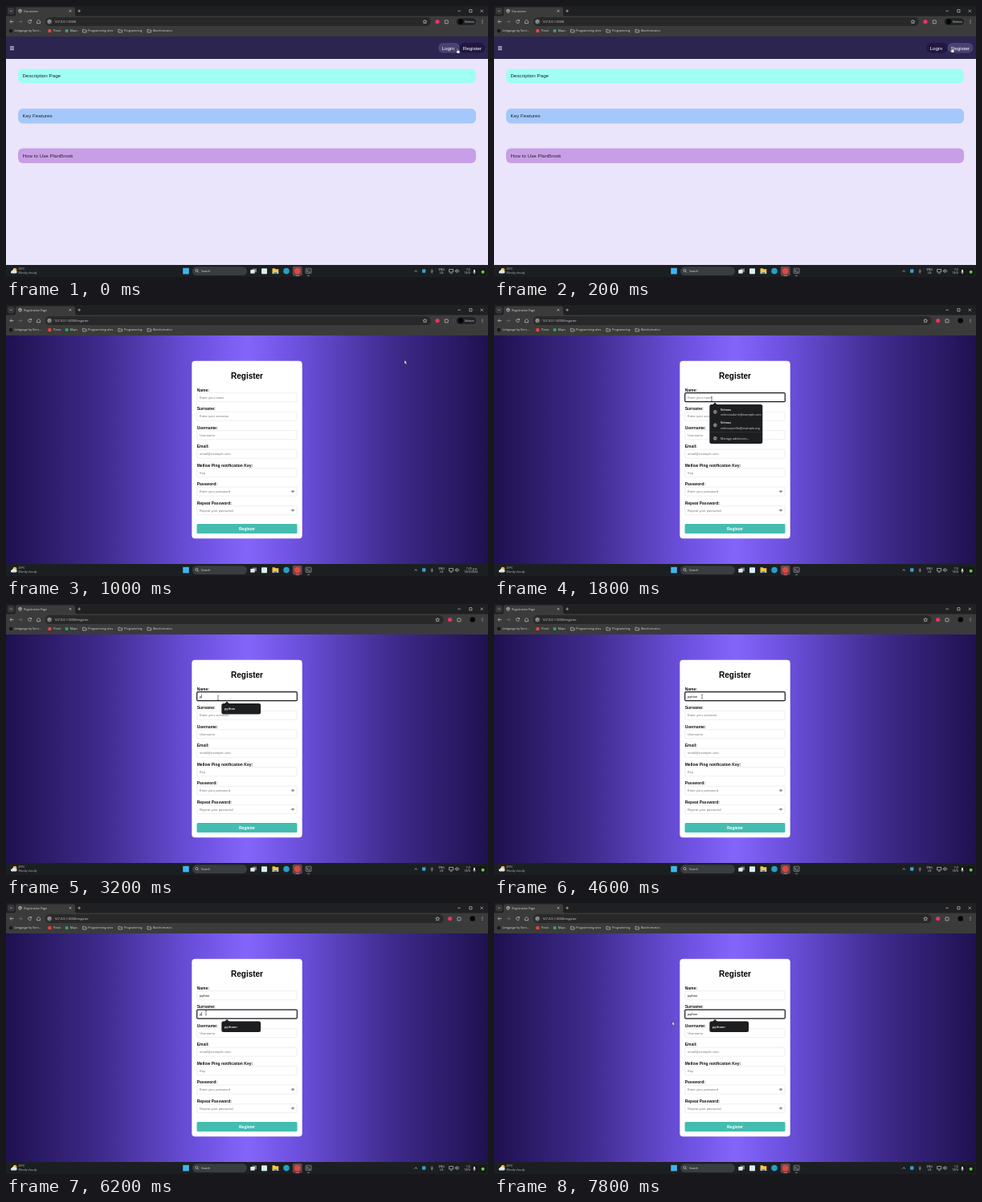
These frames come from a looping animation (600 by 338 pixels, 8000 ms). An HTML page:

```html
<!DOCTYPE html>
<html lang="en">
<head>
<meta charset="utf-8">
<title>Registration</title>
<style>
html, body { margin: 0; width: 100%; height: 100%; overflow: hidden; background: #1f1f1f; }
svg { display: block; width: 600px; height: 338px; }
text { white-space: pre; }
.ui { font: 3.55px "Open Sans", "Noto Sans", sans-serif; fill: #dcdcdc; }
.page { font: 6.25px "Liberation Sans", Arial, sans-serif; fill: #222; }
.label { font-size: 5px; font-weight: bold; fill: #111; }
.input { font-size: 4.17px; }
.mid { text-anchor: middle; }
.end { text-anchor: end; }
.line { fill: none; stroke: #cfcfcf; stroke-width: .65; }
.bold { font-weight: 600; fill: #fff; }
</style>
</head>
<body>
<svg viewBox="0 0 600 338">
  <defs>
    <linearGradient id="purple">
      <stop offset="0" stop-color="#1f1150"/>
      <stop offset=".2" stop-color="#3f2b8d"/>
      <stop offset=".4" stop-color="#6d51df"/>
      <stop offset=".5" stop-color="#8465fb"/>
      <stop offset=".6" stop-color="#6d51df"/>
      <stop offset=".8" stop-color="#3f2b8d"/>
      <stop offset="1" stop-color="#1f1150"/>
    </linearGradient>
    <g id="folder"><path class="line" d="M-2.3-1.7h1.7l.7.8h2.2v2.8h-4.6z"/></g>
    <g id="globe" class="line"><circle r="2"/><path d="M-1.8-.6h2l-.6 1.4v1M.5-1.8v1.2l1.3.6"/></g>
    <g id="eye" fill="none" stroke="#777" stroke-width=".5">
      <path d="M-2.3 0q2.3-2.7 4.6 0q-2.3 2.7-4.6 0z"/><circle r=".8" fill="#777"/>
    </g>
    <g id="person" class="line" stroke-width=".5">
      <circle r="1.9"/><circle cy="-.5" r=".6"/><path d="M-1.2 1.3q1.2-1.2 2.4 0"/>
    </g>
  </defs>

  <!-- landing page -->
  <g id="home" class="page">
    <path fill="#ebe5fb" d="M0 38h600v285H0z"/>
    <path fill="#2c2550" d="M0 38h600v28H0z"/>
    <path d="M5 50.7h5M5 52.6h5M5 54.5h5" stroke="#fff" stroke-width=".8"/>
    <rect id="loginPill" x="538" y="46" width="27" height="12.5" rx="6.2"/>
    <rect id="registerPill" x="564.5" y="46" width="32" height="12.5" rx="6.2"/>
    <g fill="#fff"><text x="542.6" y="54.5">Login</text><text x="568.8" y="54.5">Register</text></g>
    <rect x="15" y="78.5" width="570" height="18" rx="6" fill="#9ffff5"/>
    <rect x="15" y="128" width="570" height="18.4" rx="6" fill="#a5c8fb"/>
    <rect x="15" y="177.6" width="570" height="18.4" rx="6" fill="#c89fe6"/>
    <text x="20.5" y="89.4">Description Page</text>
    <text x="20.5" y="139.2">Key Features</text>
    <text x="20.5" y="188.9">How to Use PlanBrook</text>
  </g>

  <!-- registration form -->
  <g id="form" class="page">
    <path fill="url(#purple)" d="M0 38h600v285H0z"/>
    <rect x="231.3" y="69.7" width="137.4" height="221.6" rx="4" fill="#fff"/>
    <text class="mid" x="300" y="92" font-weight="bold" font-size="10" style="font-size:10px;fill:#000">Register</text>
    <g id="fields"></g>
    <rect x="237.5" y="273" width="125" height="12" rx="1.5" fill="#44bdb0"/>
    <text class="label mid" x="300" y="280.6" style="fill:#fff">Register</text>
    <rect id="caret" width=".5" height="5" fill="#111"/>
    <g id="addresses" class="ui" style="font-size:3.75px">
      <path fill="#1d1e20" d="M272 124.5l3-3 3 3z"/>
      <rect x="268.3" y="124" width="66" height="49" rx="2.5" fill="#1d1e20"/>
      <use href="#person" x="275.3" y="133.3"/>
      <text class="bold" x="282" y="132">Velmos</text>
      <text x="282" y="138.3">velmosadurin@example.com</text>
      <use href="#person" x="275.3" y="149.8"/>
      <text class="bold" x="282" y="148.4">Velmos</text>
      <text x="282" y="154.7">velmosprofile@example.org</text>
      <path d="M268.3 158.6h66" stroke="#484a4d" stroke-width=".4"/>
      <use href="#person" x="275.3" y="166.3"/>
      <text x="282" y="167.7">Manage addresses...</text>
    </g>
    <g id="hint" class="ui">
      <path fill="#1d1e20" d="M272 124.5l3-3 3 3z"/>
      <rect x="268.3" y="124" width="48.8" height="13.6" rx="2.5" fill="#1d1e20"/>
      <text id="hintText" class="bold" x="272" y="132.2" style="font-size:3.9px"></text>
    </g>
  </g>

  <!-- browser -->
  <g class="ui">
    <path fill="#1f2021" d="M0 0h600v13H0z"/>
    <path fill="#3b3b3c" d="M0 12.5h600V38H0zM10 12.5q2 0 2-2V4q0-2.5 2.5-2.5h69q2.5 0 2.5 2.5v6.5q0 2 2 2z"/>
    <rect x="2" y="2" width="8.5" height="8.5" rx="2.3" fill="#363738"/>
    <path class="line" d="M5.1 5.6l1.2 1.3 1.2-1.3M78.7 4.9l2.6 2.6m0-2.6l-2.6 2.6M89.3 6.2h3.6M91.1 4.4V8M562.3 6.2h3.6M576.8 4.6h3.2v3.2h-3.2zM590.7 4.6l3.2 3.2m0-3.2l-3.2 3.2"/>
    <use href="#globe" x="17.6" y="6.2"/>
    <text id="title" x="22.3" y="7.6"></text>
    <path class="line" d="M9.5 19.5H5m2-2l-2 2 2 2M31.5 18.5a2 2 0 1 0 .1 1.6M31.6 17v1.7h-1.7M38.5 19.2l2-1.8 2 1.8v2.5h-4z"/>
    <path class="line" style="stroke:#777" d="M15.5 19.5H20m-2-2l2 2-2 2"/>
    <rect id="bar" x="48.8" y="14" height="11" rx="5.5" fill="#282829"/>
    <circle cx="54" cy="19.5" r="3.8" fill="#3b3b3c"/>
    <use href="#globe" x="54" y="19.5"/>
    <text id="url" x="60" y="21" style="font-size:4px"></text>
    <g id="tools">
      <path class="line" d="M521.5 17.2l.7 1.5 1.7.2-1.2 1.2.3 1.7-1.5-.8-1.5.8.3-1.7-1.2-1.2 1.7-.2z"/>
      <circle cx="537" cy="19.5" r="2.6" fill="#e8345e"/>
      <path class="line" d="M546.3 18h1.4q.2-1.3 1 0h1.5v1.3q1.4.4 0 1.2v1.3h-3.9z"/>
    </g>
    <g id="profile">
      <path d="M556.6 17v5" stroke="#666" stroke-width=".4"/>
      <rect x="560" y="14.3" width="26" height="10.5" rx="5.2" fill="#222426" stroke="#66696c" stroke-width=".4"/>
      <circle cx="566" cy="19.5" r="3.3" fill="#050505"/>
      <text x="571" y="20.8">Velmos</text>
    </g>
    <circle id="avatar" cx="580.7" cy="19.5" r="3.3" fill="#070707"/>
    <g fill="#ddd"><circle cx="593" cy="17.7" r=".5"/><circle cx="593" cy="19.5" r=".5"/><circle cx="593" cy="21.3" r=".5"/></g>
    <circle cx="6" cy="31" r="2.2" fill="#15161f"/>
    <rect x="52.4" y="29.1" width="3.9" height="3.9" fill="#e3483d"/>
    <circle cx="75.6" cy="31" r="2.1" fill="#35a566"/>
    <use href="#folder" x="97.8" y="31"/><use href="#folder" x="142.2" y="31"/><use href="#folder" x="178.3" y="31"/>
    <text x="10.5" y="32.3">Linkgauge by Vorn...</text>
    <text x="59" y="32.3">Posto</text>
    <text x="79.8" y="32.3">Maps</text>
    <text x="102.2" y="32.3">Programming sites</text>
    <text x="147" y="32.3">Programming</text>
    <text x="182.9" y="32.3">Bioinformatics</text>
  </g>

  <!-- taskbar -->
  <g class="ui">
    <path fill="#1c1f22" d="M0 323h600v15H0z"/>
    <circle cx="11" cy="329.2" r="2.4" fill="#f4b53c"/>
    <path fill="#dfe5ec" d="M7.5 333.5a1.6 1.6 0 0 1 0-3.2 2.3 2.3 0 0 1 4.3-.2 1.7 1.7 0 0 1 .4 3.4z"/>
    <text x="15.6" y="329.2">29°C</text>
    <text x="15.6" y="334.3" style="fill:#b9bcbf">Mostly cloudy</text>
    <rect x="220.2" y="326.8" width="7.6" height="7.6" fill="#3fb5ee"/>
    <rect x="232" y="325.2" width="68" height="10.8" rx="5.4" fill="#3a3d40"/>
    <g class="line"><circle cx="237.4" cy="330" r="1.5"/><path d="M238.5 331.1l1.4 1.4"/></g>
    <text x="243" y="332">Search</text>
    <path fill="#777b80" d="M306.5 327.5h5.5v4.6h-5.5z"/><path fill="#e8e8e8" d="M304.3 329h5.3v4.6h-5.3z"/>
    <rect x="318" y="327.2" width="7" height="7" rx="1" fill="#d8eef4"/>
    <path fill="#f5c64b" d="M331.5 327.3h3l1 1h3.8v5.7h-7.8z"/><path fill="#3c8edb" d="M333.5 332h4v2h-4z"/>
    <circle cx="349" cy="330.6" r="3.8" fill="#269fc4"/>
    <rect x="356.8" y="324.8" width="11.8" height="11.8" rx="1.8" fill="#64474d"/>
    <circle cx="362.7" cy="330.6" r="3.8" fill="#e0483f"/>
    <path d="M360.5 336.3h4.5" stroke="#ff7d8a" stroke-width=".8"/>
    <rect x="373" y="327.2" width="7.2" height="6.4" rx=".8" fill="#34383b" stroke="#a9adb0" stroke-width=".5"/>
    <path class="line" d="M374.4 329l1.3 1.2-1.3 1.2M376.5 332h2M375.3 336.3h2.4"/>
    <path class="line" d="M508.4 331.5l1.8-1.7 1.8 1.7M530.2 328.2v2.6M528.6 330.3q1.6 3 3.2 0M530.2 332v1.5M551.6 328.5h5v3.4h-5zM553 333.3h2.4M559.3 329.7h1l1.4-1.3v4.2l-1.4-1.3h-1zM563 329q1.2 1.5 0 3"/>
    <rect x="518" y="328.3" width="4.4" height="4.4" rx="1" fill="#3b9dcc"/>
    <text class="mid" x="542.2" y="329.5">ENG</text><text class="mid" x="542.2" y="334.4">US</text>
    <text id="clock" class="end" x="587" y="329.5"></text>
    <text class="end" x="587" y="334.4">13/9/2024</text>
    <g id="overlay">
      <rect x="578.2" y="326.8" width="9.6" height="10" rx="1" fill="#17181a"/>
      <rect x="588.8" y="326.8" width="9.6" height="10" rx="1" fill="#17181a"/>
      <path d="M583 329.6v2.2" stroke="#fff" stroke-width="1.6" stroke-linecap="round"/>
      <path d="M581.2 331.8q1.8 2.6 3.6 0M583 333v1.6" fill="none" stroke="#fff" stroke-width=".5"/>
      <circle cx="593.6" cy="331.8" r="2" fill="#5fd13c"/>
    </g>
  </g>

  <g id="cursor">
    <path id="arrow" d="M0 0v4.6l1.1-1 .8 1.7.8-.4-.8-1.6h1.4z" fill="#fff" stroke="#111" stroke-width=".35"/>
    <path id="hand" d="M-.5.3q.5-.7 1 0v2l2 .5q.6.3.5 1l-.4 2.3h-3L-1.8 3.700q0-.8 1.300-.1z" fill="#fff" stroke="#111" stroke-width=".4"/>
    <path id="beam" d="M-1-2.600h.7l.3.300.3-.300H1M0-2.300v4.600M-1 2.600h.7l.3-.300.3.300H1" fill="none" stroke="#222" stroke-width=".55"/>
  </g>
</svg>
<script>
const LOOP = 8000, STEP = 200, PITCH = 23.5;
const $ = id => document.getElementById(id);
const show = (id, on) => $(id).style.display = on ? '' : 'none';

const fields = [
  ['Name', 'Enter your name'], ['Surname', 'Enter your surname'], ['Username', 'Username'],
  ['Email', 'email@example.com'], ['Mellow Ping notification Key', 'Key'],
  ['Password', 'Enter your password'], ['Repeat Password', 'Repeat your password']
];
$('fields').innerHTML = fields.map(([label, hint], i) => `
  <g transform="translate(0 ${i * PITCH})">
    <text class="label" x="237.700" y="107.800">${label}:</text>
    <rect id="box${i}" x="237.700" y="109.700" width="124.600" height="11" rx="1.200"/>
    <text id="value${i}" class="input" x="240.900" y="116.600" style="fill:#777">${hint}</text>
    ${i > 4 ? '<use href="#eye" x="357" y="115"/>' : ''}
  </g>`).join('');

// time, x, y
const path = [
  [0, 562, 53], [200, 570, 52], [400, 573, 52], [800, 573, 52], [1400, 276, 117], [1600, 271, 117],
  [3000, 271, 117], [3200, 264, 117], [4200, 264, 117], [4600, 259, 115.5], [4800, 256, 122],
  [5200, 249, 137], [6800, 249, 137], [7600, 222, 148], [8000, 222, 148]
];

function pointer(t) {
  const n = path.findIndex(p => p[0] > t);
  const [t0, x0, y0] = path[n - 1], [t1, x1, y1] = path[n];
  const k = (t - t0) / (t1 - t0), e = k * k * (3 - 2 * k);
  return [x0 + (x1 - x0) * e, y0 + (y1 - y0) * e];
}

const typed = (t, start) =>
  'python'.slice(0, Math.max(0, Math.floor((t - start) / STEP) + 1));

function setField(i, text, focused) {
  const value = $('value' + i), box = $('box' + i);
  value.textContent = text || fields[i][1];
  value.style.fill = text ? '#111' : '#777';
  box.setAttribute('fill', '#fff');
  box.setAttribute('stroke', focused ? '#15171c' : '#dedee2');
  box.setAttribute('stroke-width', focused ? 1.2 : .5);
}

function draw(t) {
  const home = t < 400, early = t < 1400;
  show('home', home);
  show('form', !home);
  show('profile', early);
  show('avatar', !early);
  show('overlay', home || !early);
  $('loginPill').setAttribute('fill', t < 200 ? '#4b4273' : '#211742');
  $('registerPill').setAttribute('fill', t < 200 ? '#211742' : '#4b4273');
  $('title').textContent = home ? 'Document' : 'Registration Page';
  $('url').textContent = '127.0.0.1:5000' + (home ? '' : '/register');
  $('clock').textContent = (!home && early ? '7:25' : '7:27') + ' μ.μ.';
  $('bar').setAttribute('width', early ? 480 : 496);
  $('tools').setAttribute('transform', `translate(${early ? 0 : 15.7})`);

  const focus = t < 1600 ? -1 : t < 5200 ? 0 : 1;
  const texts = [typed(t, 3200), typed(t, 6200)];
  fields.forEach((f, i) => setField(i, texts[i] || '', i === focus));

  show('addresses', t >= 1800 && t < 3200);
  const hint = focus === 0 ? t >= 3200 && t < 4200 : t >= 6200;
  show('hint', hint);
  $('hintText').textContent = focus === 1 ? 'pythonn' : 'python';
  $('hint').setAttribute('transform', `translate(0 ${focus === 1 ? PITCH : 0})`);

  show('caret', t >= 2600 && t < 4200 || t >= 6200 && t < 7200);
  if (focus >= 0) {
    const width = texts[focus] ? $('value' + focus).getComputedTextLength() : 0;
    $('caret').setAttribute('x', 241 + width);
    $('caret').setAttribute('y', 112.5 + focus * PITCH);
  }

  const [x, y] = pointer(t);
  const overField = !home && x > 237 && x < 363 && (y - 109) % PITCH < 12 && y > 109;
  show('hand', home);
  show('beam', overField);
  show('arrow', !home && !overField);
  $('cursor').setAttribute('transform', `translate(${x} ${y})`);
}

const start = performance.now();
function tick() {
  const t = (performance.now() - start) % LOOP;
  draw(Math.floor(t / STEP) * STEP);
  requestAnimationFrame(tick);
}
tick();
</script>
</body>
</html>
```
